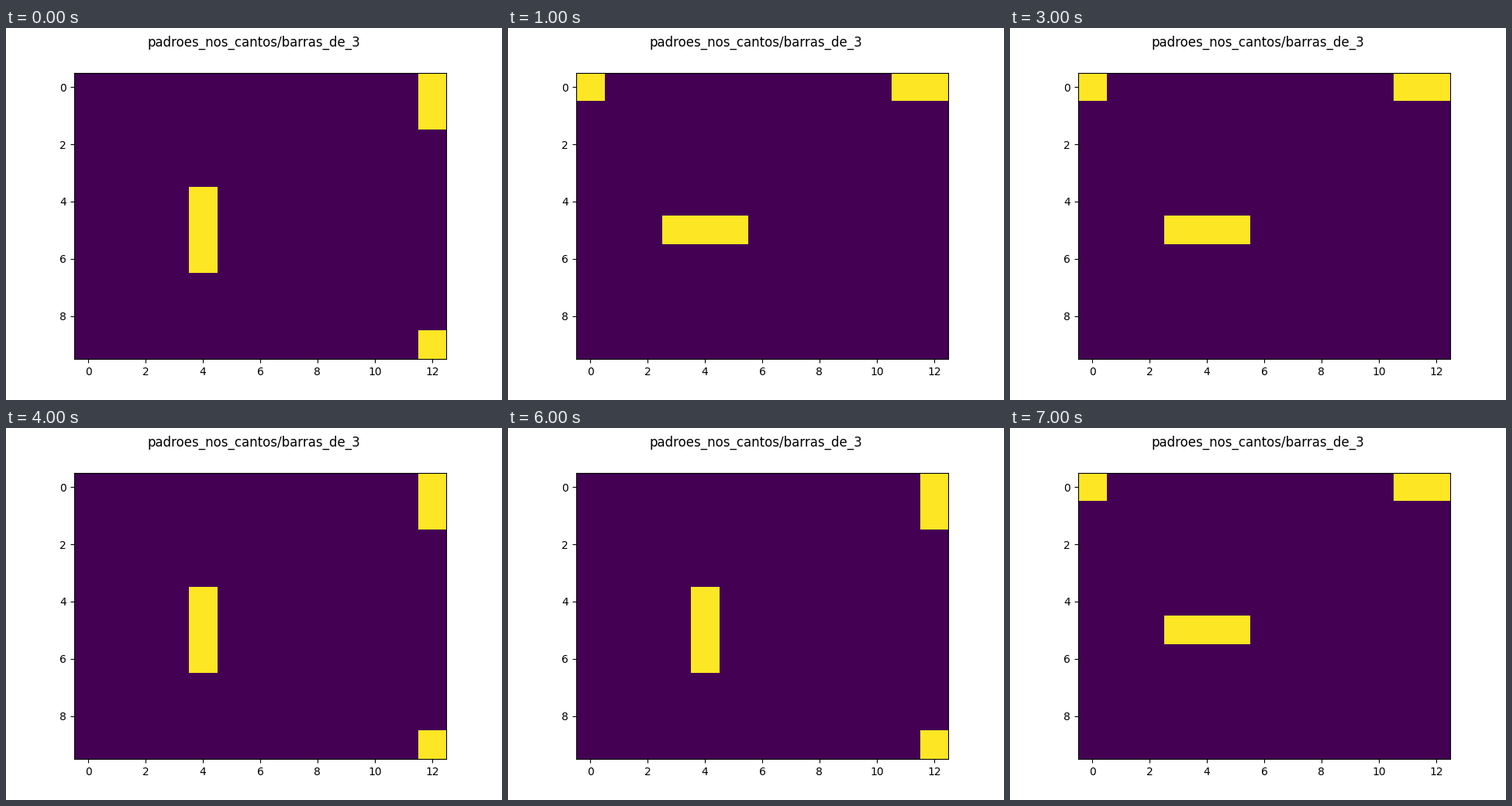
A matplotlib script for the animation above (8 s loop, 640 px wide and 480 px high).

```python
import numpy as np
import matplotlib.pyplot as plt
from matplotlib.animation import FuncAnimation

ROWS, COLS = 10, 13
STEPS = 8
STEP_MS = 1000


def add_bar(grid, row, col):
    """Put a vertical bar of three live cells, wrapping at the edges."""
    for dr in (-1, 0, 1):
        grid[(row + dr) % ROWS, col] = 1


def evolve(grid):
    """One Game of Life generation on a torus."""
    near = sum(
        np.roll(grid, (dr, dc), axis=(0, 1))
        for dr in (-1, 0, 1)
        for dc in (-1, 0, 1)
        if dr or dc
    )
    return ((near == 3) | ((grid == 1) & (near == 2))).astype(int)


start = np.zeros((ROWS, COLS), dtype=int)
add_bar(start, 5, 4)
add_bar(start, 0, 12)

generations = [start]
for _ in range(STEPS - 1):
    generations.append(evolve(generations[-1]))

plt.rcParams["font.family"] = "DejaVu Sans"
fig, ax = plt.subplots(figsize=(6.4, 4.8), dpi=100)
fig.suptitle("padroes_nos_cantos/barras_de_3")
image = ax.imshow(start, cmap="viridis", vmin=0, vmax=1)


def update(step):
    image.set_data(generations[step])
    return (image,)


anim = FuncAnimation(fig, update, frames=STEPS, interval=STEP_MS,
                     repeat=True, repeat_delay=0)
plt.show()
```
